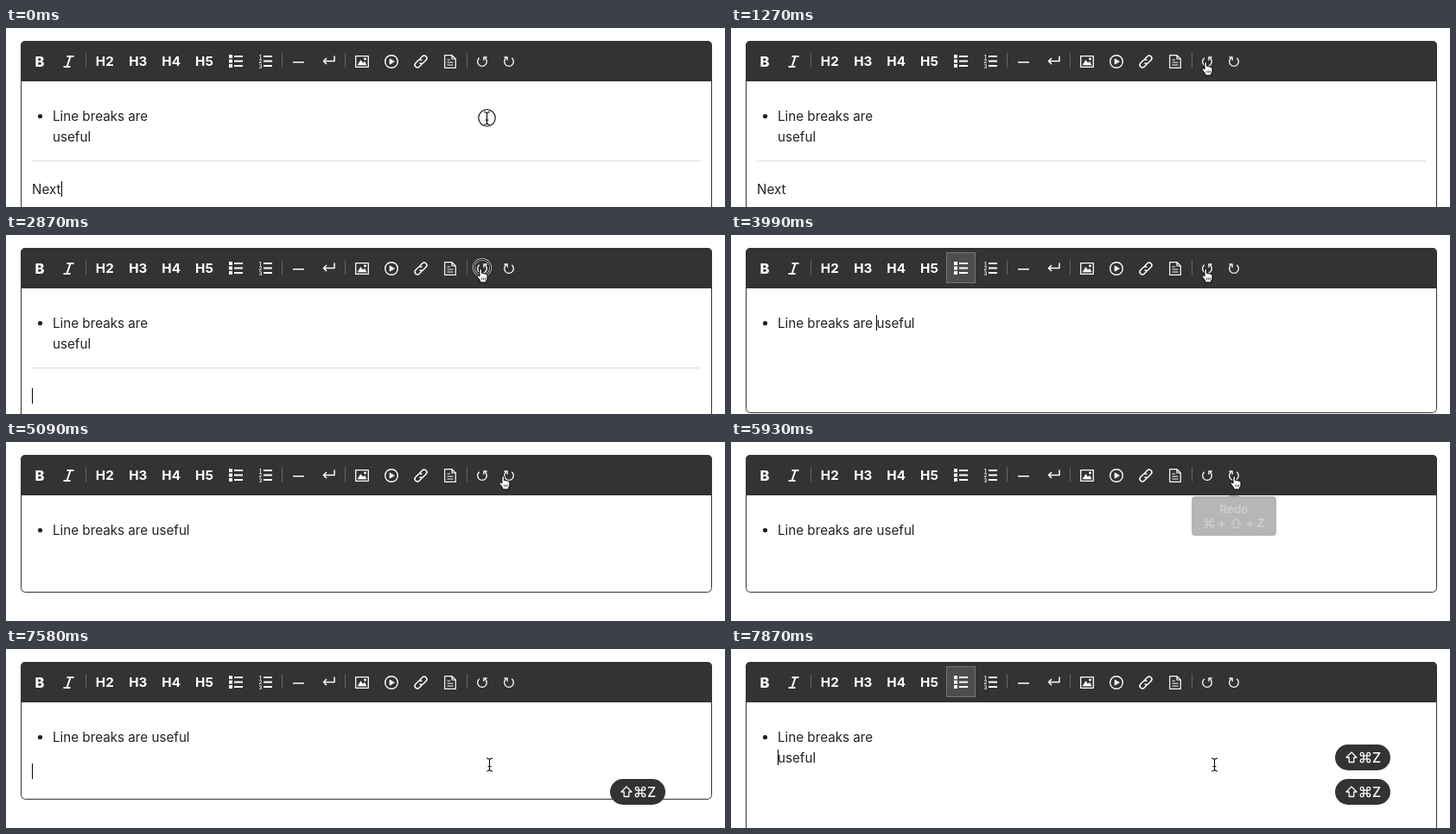
These frames come from a looping animation (832x208 px, 8 s). An HTML page with a canvas:

```html
<!DOCTYPE html>
<html lang="en">
<head>
<meta charset="utf-8">
<title>Editor undo and redo</title>
<style>
html, body { margin: 0; width: 832px; height: 208px; overflow: hidden; background: #fff; }
canvas { display: block; }
</style>
</head>
<body>
<canvas id="stage" width="832" height="208"></canvas>
<script>
const ctx = document.getElementById('stage').getContext('2d');
const LOOP = 8000;
const DARK = '#333', INK = '#222';
const FONT = 'Inter, "Liberation Sans", sans-serif';

// Document states; each holds until the next one starts.
const docs = [
  { at: 0, lines: 2, rule: true, para: 'Next', caret: [64, 187] },
  { at: 2640, lines: 2, rule: true, caret: [30, 187] },
  { at: 2930, lines: 2, list: true, emptyItem: true, caret: [54, 150] },
  { at: 3580, lines: 2, list: true, caret: [98, 126] },
  { at: 3990, lines: 1, list: true, bottom: 207, caret: [168, 102] },
  { at: 4350, lines: 1, bottom: 175, caret: [30, 142] },
  { at: 7640, lines: 1, bottom: 207, caret: [30, 174] },
  { at: 7870, lines: 2, list: true, caret: [54, 126] }
];
const caretToggles = [260, 760, 1270, 1750, 2220, 2640, 2930, 3280,
  4830, 5330, 5750, 6230, 6700, 7220];
const clicks = [[0, 60], [2580, 2640], [2870, 2930], [3230, 3280],
  [3520, 3580], [3870, 3990], [4230, 4350]];
const moves = [
  { at: 440, from: [556.5, 104.5], via: [553.7, 71], to: [551, 38] },
  { at: 4710, from: [551, 38], via: [567.5, 38], to: [584, 38] },
  { at: 6700, from: [584, 38], via: [585.5, 86], to: [559.5, 134] }
];
const STEP = 59, STEPS = 10;

function text(str, x, y, size, weight = 400, color = '#fff', align = 'left') {
  ctx.font = `${weight} ${size}px ${FONT}`;
  ctx.fillStyle = color;
  ctx.textAlign = align;
  ctx.textBaseline = 'alphabetic';
  ctx.fillText(str, x, y);
}

function rect(x, y, w, h, color) {
  ctx.fillStyle = color;
  ctx.fillRect(x, y, w, h);
}

function round(x, y, w, h, r, color) {
  ctx.beginPath();
  ctx.roundRect(x, y, w, h, r);
  ctx.fillStyle = color;
  ctx.fill();
}

function stroke(d, x, y, width = 1.4, color = '#fff', fill) {
  ctx.save();
  ctx.translate(x, y);
  const path = new Path2D(d);
  if (fill) {
    ctx.fillStyle = fill;
    ctx.fill(path);
  }
  ctx.lineWidth = width;
  ctx.strokeStyle = color;
  ctx.lineJoin = 'round';
  ctx.stroke(path);
  ctx.restore();
}

function disc(x, y, r, color) {
  ctx.beginPath();
  ctx.arc(x, y, r, 0, Math.PI * 2);
  ctx.fillStyle = color;
  ctx.fill();
}

function turnArrow(x, dir) {
  ctx.save();
  ctx.translate(x, 39);
  ctx.scale(dir, 1);
  stroke('M-3.2-4.2A5.3 5.3 0 1 0 3.2-4.2', 0, 0, 1.3);
  stroke('M5.6-5H1.9V-1.3', 0, 0, 1.3);
  ctx.restore();
}

function toolbar(listActive) {
  round(17, 15, 800, 47, [5, 5, 0, 0], DARK);
  for (const x of [92, 319, 392, 533]) rect(x, 29, 1, 17, '#666');
  if (listActive) {
    rect(249, 20, 34, 36, '#777');
    rect(250, 21, 32, 34, '#4d4d4d');
  }
  text('B', 39, 45, 16.5, 800, '#fff', 'center');
  stroke('M-2-6H6M-6 6H2M2-6L-2 6', 72.5, 39, 2);
  [2, 3, 4, 5].forEach((n, i) =>
    text('H' + n, 114.3 + i * 38.4, 44, 15.2, 700, '#fff', 'center'));

  for (let i = 0; i < 3; i++) {
    const y = 32 + i * 5.5;
    rect(258, y - 1, 4, 4, '#fff');
    rect(264, y, 10, 2, '#fff');
    rect(298, y, 10, 2, '#fff');
    text(i + 1, 294.3, y + 3.5, 6, 600, '#fff', 'center');
  }
  rect(332, 39, 13, 1.5, '#fff');
  stroke('M6.5-5.5V.5H-6M-2.5-3L-6 .5L-2.5 4', 373.5, 38, 1.5);

  stroke('M-7.3-6.3H7.3V6.3H-7.3Z', 412, 39, 1.3);
  stroke('M-5 4L-1.5-1.5L1 2L3 0L5 4Z', 412, 39, .6, '#fff', '#fff');
  disc(415.5, 36, 1.4, '#fff');
  stroke('M-7.3 0A7.3 7.3 0 1 0 7.3 0A7.3 7.3 0 1 0-7.3 0', 446, 39);
  stroke('M-2-3.2L3.5 0L-2 3.2Z', 446, 39, .6, '#fff', '#fff');

  ctx.save();
  ctx.translate(480, 39);
  ctx.rotate(-Math.PI / 4);
  stroke('M-1 3H-5.5A3 3 0 0 1-5.5-3H-1A3 3 0 0 1 2 0M1-3H5.5A3 3 0 0 1 5.5 3H1A3 3 0 0 1-2 0', 0, 0, 1.5);
  ctx.restore();
  stroke('M-6.3-7.3H2L6.3-3V7.3H-6.3ZM2-7.3V-3H6.3M-3.5-2H0M-3.5 1H3.5M-3.5 4H3.5', 514, 39, 1.2);
  turnArrow(551, 1);
  turnArrow(582, -1);
}

function commandSign(x, y, s) {
  const loop = 'M-2-2H-4A2 2 0 1 1-2-4V4A2 2 0 1 1-4 2H4A2 2 0 1 1 2 4V-4A2 2 0 1 1 4-2Z';
  ctx.save();
  ctx.translate(x, y);
  ctx.scale(s, s);
  stroke(loop, 0, 0, 1.4);
  ctx.restore();
}

function shiftSign(x, y, s) {
  ctx.save();
  ctx.translate(x, y);
  ctx.scale(s, s);
  stroke('M0-6L6 0H2.8V5.5H-2.8V0H-6Z', 0, 0, 1.3);
  ctx.restore();
}

function tooltip(x, width, label, withShift, alpha) {
  if (alpha <= 0) return;
  ctx.save();
  ctx.globalAlpha = alpha;
  const bg = '#262626';
  round(x - width / 2, 63, width, 46, 4, bg);
  ctx.beginPath();
  ctx.moveTo(x - 6.5, 63.5);
  ctx.lineTo(x, 57);
  ctx.lineTo(x + 6.5, 63.5);
  ctx.fill();
  text(label, x, 83, 13.3, 700, '#fff', 'center');
  const left = x - (withShift ? 29 : 14);
  commandSign(left, 94.5, .9);
  text('+', left + 15, 99, 13.3, 700, '#fff', 'center');
  if (withShift) {
    shiftSign(x + 2.5, 94.5, .95);
    text('+', x + 18.5, 99, 13.3, 700, '#fff', 'center');
  }
  text('Z', x + (withShift ? 31 : 16), 99, 13.3, 700, '#fff', 'center');
  ctx.restore();
}

function badge(y) {
  round(699, y, 64, 30, 15, DARK);
  shiftSign(718, y + 15, 1);
  commandSign(734, y + 15, .95);
  text('Z', 747, y + 21, 16, 500, '#fff', 'center');
}

function bullet(y) {
  disc(39.5, y, 2.6, INK);
}

function page(doc, caretOn) {
  ctx.beginPath();
  ctx.roundRect(17.5, 15.5, 799, (doc.bottom || 260) - 16, 5);
  ctx.lineWidth = 1;
  ctx.strokeStyle = DARK;
  ctx.stroke();
  toolbar(doc.list);

  bullet(102.5);
  const write = (str, x, y) => text(str, x, y, 15.2, 400, INK);
  write(doc.lines === 1 ? 'Line breaks are useful' : 'Line breaks are', 54, 108);
  if (doc.lines === 2) write('useful', 54, 132);
  if (doc.emptyItem) bullet(150.5);
  if (doc.rule) rect(30, 154, 774, 1, '#ddd');
  if (doc.para) write(doc.para, 30, 193);
  if (caretOn) rect(doc.caret[0], doc.caret[1] - 9, 1, 18, '#000');
}

function pointerAt(t) {
  let pos = moves[0].from;
  for (const { at, from, via, to } of moves) {
    if (t < at) break;
    const p = Math.min(1, (Math.floor((t - at) / STEP) + 1) / STEPS);
    const e = p * p * (3 - 2 * p);
    pos = [0, 1].map(i =>
      (1 - e) ** 2 * from[i] + 2 * e * (1 - e) * via[i] + e * e * to[i]);
  }
  return pos;
}

function pointer(x, y) {
  if (y > 61) {
    const beam = 'M-3.5-7.5Q0-7.5 0-5Q0-7.5 3.5-7.5M0-5.5V5.5M-3.5 7.5Q0 7.5 0 5Q0 7.5 3.5 7.5M-2 2H2';
    stroke(beam, x, y + .5, 2.6, 'rgba(255,255,255,.65)');
    stroke(beam, x, y + .5, 1.1, '#000');
  } else {
    stroke('M-3 10V3Q-3 1.3-1.7 1.3Q-.4 1.3-.4 3V6.5Q1.5 5.5 2 7Q3.8 6.3 4.2 7.7Q6 7.2 6 9V12Q6 14 4.7 15V17H-2.3V15.3L-5.6 10.7Q-6.3 9.3-5 8.8Q-4 8.7-3 10Z',
      x, y, 1, '#000', '#fff');
    stroke('M-.3 11.5V14M1.6 11.5V14M3.5 11.5V14', x, y, .7, '#000');
  }
}

function clickRing(x, y) {
  for (const [width, color] of [[2.6, 'rgba(255,255,255,.8)'], [1.1, '#000']]) {
    ctx.beginPath();
    ctx.arc(x, y, 9.7, 0, Math.PI * 2);
    ctx.lineWidth = width;
    ctx.strokeStyle = color;
    ctx.stroke();
  }
}

// Stepped fade: one level per video tick.
function fade(t, start, ticks) {
  return t < start ? 0 : Math.min(1, (Math.floor((t - start) / 60) + 1) / ticks);
}

function draw(t) {
  rect(0, 0, 832, 208, '#fff');
  const doc = docs.filter(d => d.at <= t).pop();
  const caretOn = caretToggles.filter(at => at <= t).length % 2 === 0;
  page(doc, caretOn);

  if (t < 2580) tooltip(551, 68, 'Undo', false, fade(t, 1750, 2));
  tooltip(582, 98, 'Redo', true, fade(t, 5930, 3) - fade(t, 6940, 3));
  if (t >= 7580) badge(151);
  if (t >= 7870) badge(111);

  const [x, y] = pointerAt(t);
  if (clicks.some(([from, to]) => t >= from && t < to)) clickRing(x, y);
  pointer(x, y);
}

const start = performance.now();
function tick() {
  draw((performance.now() - start) % LOOP);
  requestAnimationFrame(tick);
}
tick();
</script>
</body>
</html>
```
